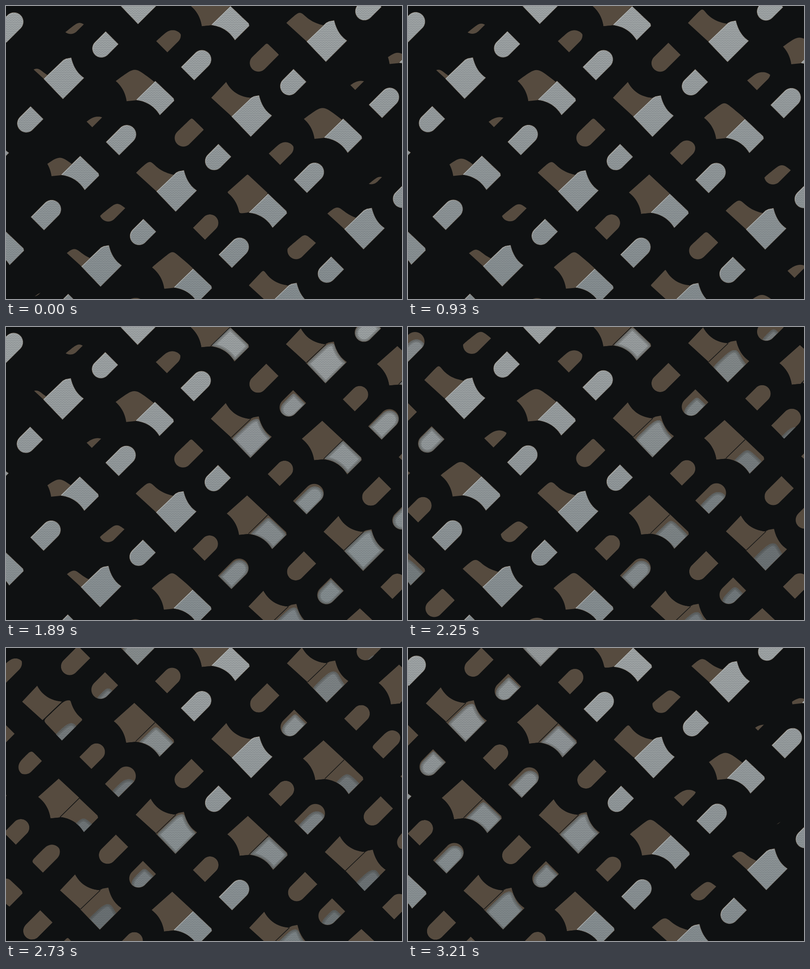
Animation, 870 px wide and 644 px high, one loop 3240 ms. Source, as an HTML page with a canvas:

```html
<!DOCTYPE html>
<html lang="en">
<head>
<meta charset="utf-8">
<title>Woven relief</title>
<style>
  html, body { margin: 0; width: 100%; height: 100%; overflow: hidden; background: #0f1112; }
  canvas { display: block; width: 870px; height: 644px; }
</style>
</head>
<body>
<canvas id="stage" width="870" height="644"></canvas>
<script>
const W = 870, H = 644, LOOP = 3240, STEP = 120;
const DARK = '#0f1112', BROWN = '#564b3f';
const ctx = document.getElementById('stage').getContext('2d');

const mix = (a, b, k) => a + (b - a) * k;
const clamp = v => Math.min(1, Math.max(0, v));

// Value over time through a few [step, value] points.
function track(...keys) {
  return step => {
    let i = 0;
    while (i < keys.length - 2 && step >= keys[i + 1][0]) i++;
    const [[s0, a], [s1, b]] = [keys[i], keys[i + 1]];
    return mix(a, b, clamp((step - s0) / (s1 - s0)));
  };
}

const left = track([0, -70], [8, -74], [16, -74], [17, -60], [19, 18], [21, 85], [23, 80], [25, 22], [27, 0]);
const right = track([0, -66], [8, -30], [16, 3], [19, 50], [23, 72], [27, -78]);
const middle = track([7, 0], [16, 7], [19, 12], [23, 0], [27, -13]);
const zoom = track([16, 1], [23, 1.007], [27, 1.001]);
const shear = track([0, 0], [16, .003], [19, .002], [27, -.008]);
const driftX = track([0, 0], [8, -.7], [19, -1], [23, 0], [27, 1.4]);
const driftY = track([16, 0], [19, -1], [23, -.8], [27, -.3]);

// Lean of the relief: below zero hides the brown floors, above zero covers the wool.
function lean(x, step) {
  const l = clamp(1 - x / 435) ** 1.3;
  const r = clamp((x - 490) / 380) ** 2;
  const m = Math.exp(-(((x - 600) / 100) ** 2));
  return left(step - Math.max(0, x) / 130) * l + right(step) * r + middle(step) * m;
}

// Outline from points; a four-number entry is a quadratic curve.
function outline(...list) {
  const pts = [];
  for (const p of list) {
    if (p.length === 2) { pts.push(p); continue; }
    const [x0, y0] = pts[pts.length - 1], [cx, cy, x, y] = p;
    for (let i = 1; i <= 12; i++) {
      const t = i / 12;
      pts.push([mix(mix(x0, cx, t), mix(cx, x, t), t), mix(mix(y0, cy, t), mix(cy, y, t), t)]);
    }
  }
  return pts;
}

// Slot with one round end, towards the upper right (dir 1) or lower left (-1).
function slot(x, y, side, len, dir) {
  const r = side * Math.SQRT1_2, d = dir * len * Math.SQRT1_2;
  const cx = x + side / 2 + d, cy = y + side / 2 - d, pts = [[x, y]];
  for (let i = 0; i <= 20; i++) {
    const a = Math.PI * (1.25 + dir * i / 20);
    pts.push([cx + r * Math.cos(a), cy + r * Math.sin(a)]);
  }
  pts.push([x + side, y + side]);
  return pts;
}

function resample(pts, count) {
  const ring = [...pts, pts[0]], acc = [0];
  for (let i = 1; i < ring.length; i++)
    acc.push(acc[i - 1] + Math.hypot(ring[i][0] - ring[i - 1][0], ring[i][1] - ring[i - 1][1]));
  const out = [], total = acc[acc.length - 1];
  for (let n = 0, i = 0; n < count; n++) {
    const d = total * n / count;
    while (acc[i + 1] <= d) i++;
    const k = (d - acc[i]) / (acc[i + 1] - acc[i]);
    out.push([mix(ring[i][0], ring[i + 1][0], k), mix(ring[i][1], ring[i + 1][1], k)]);
  }
  return out;
}

function toPath(pts) {
  const p = new Path2D();
  pts.forEach(([x, y], i) => i ? p.lineTo(x, y) : p.moveTo(x, y));
  p.closePath();
  return p;
}

const MAX_SOFT = 16, RING = 64;
const topOf = pts => Math.min(...pts.map(p => p[1]));

// Keeps ever rounder versions of the outline, each with the drop of its top.
function makeShape(pts, knit, seam) {
  const soft = [{ path: toPath(pts), drop: 0 }];
  let ring = resample(pts, RING);
  const midX = ring.reduce((s, p) => s + p[0], 0) / RING;
  for (let n = 1; n <= MAX_SOFT; n++) {
    ring = ring.map((p, i) => {
      const a = ring[(i + RING - 1) % RING], b = ring[(i + 1) % RING];
      return [(a[0] + 2 * p[0] + b[0]) / 4, (a[1] + 2 * p[1] + b[1]) / 4];
    });
    soft.push({ path: toPath(ring), drop: topOf(ring) - topOf(pts) });
  }
  return { full: soft[0].path, soft, midX, knit, seam: seam && [pts[0], pts[1]] };
}

// Coordinates are relative to the bottom corner of the large woollen piece.
const SHAPES = [
  makeShape(outline([-87, -85], [-54, -120], [-37, -88, 1, -85], [-42, -44])),
  makeShape(outline([-52, 123], [-7, 83], [38, 125], [-5, 168], [-25, 170], [-29, 141, -52, 123])),
  makeShape(slot(-130, -42, 27, 44.6, -1)),
  makeShape(slot(38, 36, 26.5, 34, 1)),
  makeShape(outline([-42, -44], [1, -85], [7, -88], [18, -90], [25, -60, 46, -46], [0, 0]), true, true),
  makeShape(outline([-4, 167], [38, 126], [78, 164], [79, 169], [48, 200], [30, 171, -4, 167]), true, true),
  makeShape(slot(-71, 17, 27.5, 33, -1), true),
  makeShape(slot(95, 95, 28.5, 44, 1), true)
];

const CELLS = [];
for (let i = -5; i <= 7; i++)
  for (let j = -4; j <= 5; j++) {
    const x = 125 + 165 * i + 247.7 * j, y = 204 - 164.7 * i + 247.5 * j;
    if (x > -150 && x < W + 160 && y > -230 && y < H + 150) CELLS.push([x, y]);
  }

const wool = ctx.createLinearGradient(0, 0, 0, H);
wool.addColorStop(0, '#a2a7a8');
wool.addColorStop(1, '#868e91');

function makeKnit() {
  const tile = document.createElement('canvas'), g = tile.getContext('2d');
  tile.width = 6;
  tile.height = 5;
  g.fillStyle = 'rgba(70,78,82,.34)';
  g.fillRect(0, 0, 3, 1);
  g.fillRect(3, 1, 3, 1);
  g.fillStyle = 'rgba(70,78,82,.14)';
  g.fillRect(0, 3, 6, 1);
  return ctx.createPattern(tile, 'repeat');
}
const knit = makeKnit();

function placed(path, x, y, stretch = 1, midX = 0) {
  const p = new Path2D();
  p.addPath(path, new DOMMatrix([stretch, 0, 0, 1, x + midX * (1 - stretch), y]));
  return p;
}

// Rounded copy whose top sits exactly `shift` below the top of the shape.
function lowered(shape, x, y, shift, round, stretch) {
  const { path, drop } = shape.soft[Math.min(MAX_SOFT, Math.round(shift * round))];
  return placed(path, x, y + shift - drop, stretch, shape.midX);
}

function drawFloor(shape, x, y, shift) {
  const full = placed(shape.full, x, y);
  ctx.save();
  ctx.clip(full);
  ctx.fillStyle = BROWN;
  ctx.fill(lowered(shape, x, y, shift, .8, 1 + Math.min(.25, shift / 60)));
  ctx.restore();
}

function drawWool(shape, x, y, shift) {
  const full = placed(shape.full, x, y), flat = shift < 2;
  if (flat) shift = 0;
  if (shift < 40) {
    ctx.strokeStyle = BROWN;
    ctx.lineWidth = 1.5;
    ctx.stroke(full);
  }
  ctx.save();
  ctx.clip(full);
  const gap = Math.max(0, shift - 45) * .3;
  ctx.fillStyle = flat ? '#b4b8b8' : BROWN;
  ctx.fill(lowered(shape, x + gap * .6, y, gap, 1.5));
  const face = flat ? placed(shape.full, x + 1, y + 1) : lowered(shape, x + shift * .2, y, shift, .7);
  ctx.clip(face);
  for (const paint of [wool, knit, `rgba(60,66,68,${Math.min(.4, shift / 70)})`]) {
    ctx.fillStyle = paint;
    ctx.fillRect(x - 150, y - 130, 320, 350);
  }
  if (!flat) {
    ctx.strokeStyle = 'rgba(60,60,58,.25)';
    for (const w of [6, 12]) {
      ctx.lineWidth = w;
      ctx.stroke(face);
    }
  }
  ctx.restore();
  if (shape.seam && !flat) {
    ctx.strokeStyle = DARK;
    ctx.lineWidth = 1.3;
    ctx.beginPath();
    for (const [px, py] of shape.seam) ctx.lineTo(x + px, y + py);
    ctx.stroke();
  }
}

function draw(step) {
  const z = zoom(step), k = shear(step);
  ctx.setTransform(1, 0, 0, 1, 0, 0);
  ctx.fillStyle = DARK;
  ctx.fillRect(0, 0, W, H);
  ctx.translate(W / 2 + driftX(step), H / 2 + driftY(step));
  ctx.transform(z, k, 0, z, 0, 0);
  ctx.translate(-W / 2, -H / 2);
  ctx.lineJoin = 'round';
  for (const shape of SHAPES)
    for (const [x, y] of CELLS) {
      const s = lean(x + shape.midX, step);
      if (shape.knit) drawWool(shape, x, y, Math.max(0, s));
      else drawFloor(shape, x, y, Math.max(0, -s));
    }
}

let last = -1;
const start = performance.now();
function tick() {
  const t = (performance.now() - start) % LOOP;
  const step = Math.floor((t + 30) / STEP);
  if (step !== last) draw(last = step);
  requestAnimationFrame(tick);
}
tick();
</script>
</body>
</html>
```
